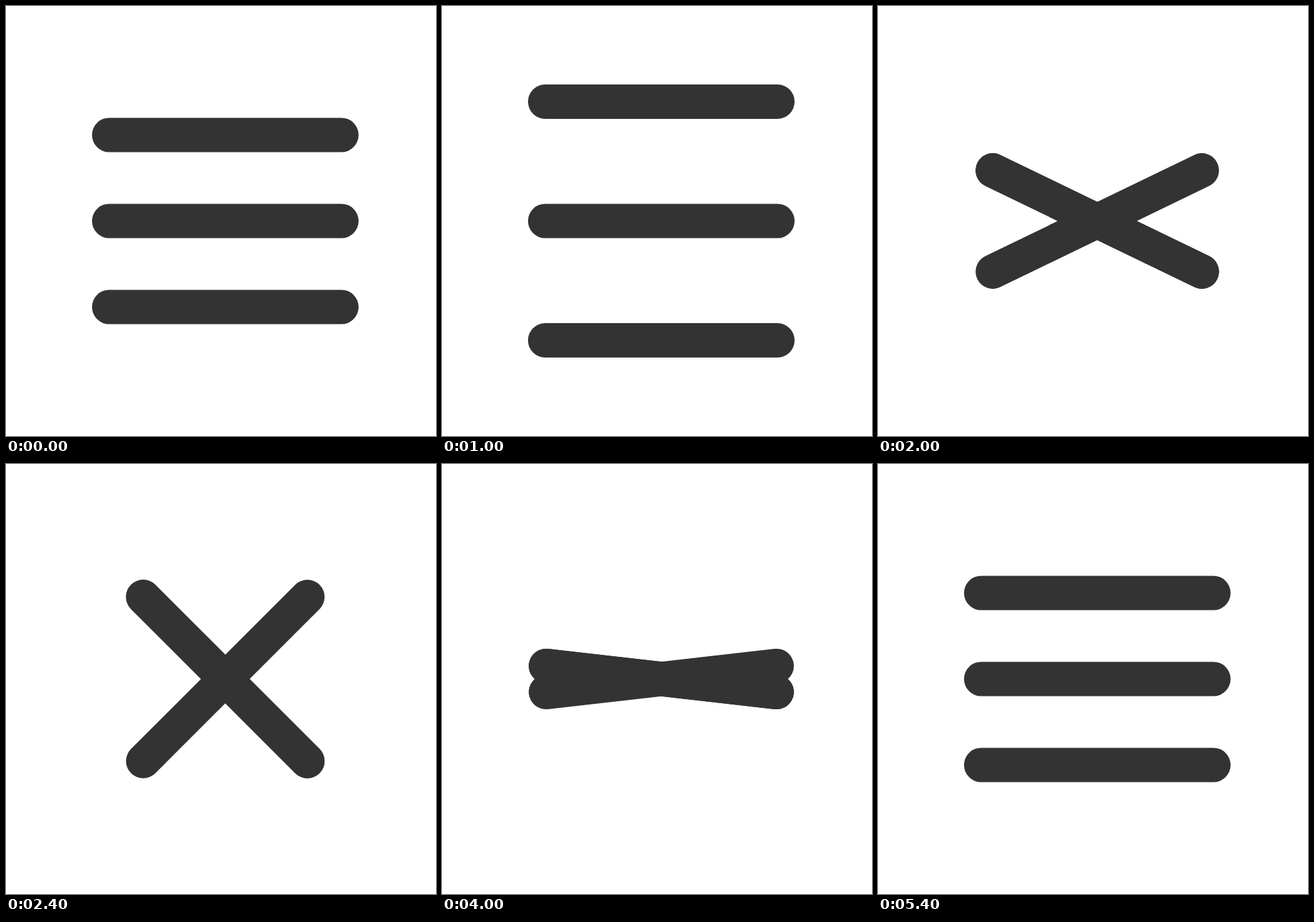
Animation, 640 px wide and 640 px high, one loop 5.6 s. Source, as an HTML page:

```html
<!DOCTYPE html>
<html lang="en">
<head>
<meta charset="utf-8">
<title>Menu icon</title>
<style>
  html, body { margin: 0; width: 100%; height: 100%; overflow: hidden; background: #fff; }
  svg { display: block; width: 100%; height: 100%; }
</style>
</head>
<body>
<svg viewBox="0 0 640 640" stroke="#333" stroke-width="51.2" stroke-linecap="round">
  <path class="bar" d="M153.6 320H499.2"/>
  <path class="bar" d="M153.6 320H499.2"/>
  <path class="bar" d="M153.6 320H499.2"/>
</svg>
<script>
  const LOOP = 5600, STEP = 100;
  const REST = 128, WIDE = 179.2;
  const [top_, middle, bottom] = document.querySelectorAll('.bar');

  // Linear progress from 0 to 1, beginning at start
  const ramp = (t, start, length) => Math.min(1, Math.max(0, (t - start) / length));

  function gapAt(t) {
    return REST
      + (WIDE - REST) * ramp(t, 395, 466)
      - WIDE * ramp(t, 997, 350)
      + WIDE * ramp(t, 4388, 466)
      - (WIDE - REST) * ramp(t, 4997, 350);
  }

  const angleAt = t => 45 * (ramp(t, 1594, 707) - ramp(t, 3394.5, 707));

  function place(bar, y, angle) {
    bar.setAttribute('transform', `translate(0 ${y}) rotate(${angle} 326.4 320)`);
  }

  function draw(ms) {
    const t = Math.floor((ms % LOOP) / STEP) * STEP;
    const gap = gapAt(t), angle = angleAt(t);
    place(top_, -gap, angle);
    place(middle, 0, angle);
    place(bottom, gap, -angle);
  }

  const begin = performance.now();
  function tick() {
    draw(performance.now() - begin);
    requestAnimationFrame(tick);
  }
  tick();
</script>
</body>
</html>
```
